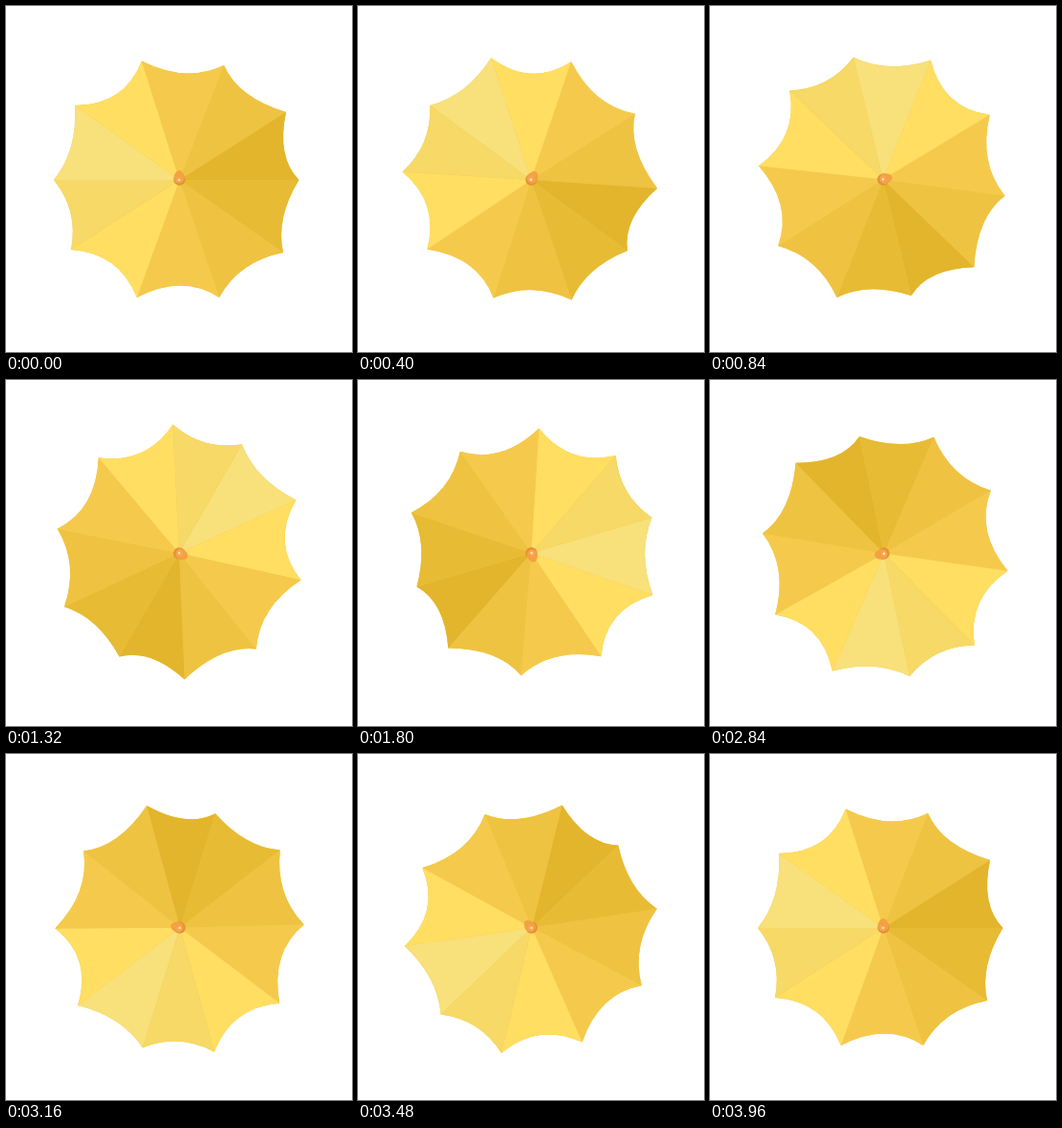
An HTML page with a canvas that plays this animation: 362 by 362 pixels, repeating every 4 s.

```html
<!DOCTYPE html>
<html lang="en">
<head>
<meta charset="utf-8">
<title>Spinning parasol</title>
<style>
  html, body { margin: 0; width: 100%; height: 100%; overflow: hidden; background: #fff; }
  canvas { display: block; width: 100vmin; height: 100vmin; }
</style>
</head>
<body>
<canvas id="stage"></canvas>
<script>
const SIZE = 362, STEP = 40, STEPS = 100;
const PIVOT = 181.5, HUB = [181.5, 182];

// Each panel: rib tip x, y, control point of its scalloped hem, colour.
const panels = [
  [50, 182, 75, 151, '#f8e07a'],
  [72, 104, 124, 104, '#ffde61'],
  [142, 57.5, 188, 81, '#f5ca4c'],
  [228, 62, 243, 96, '#efc342'],
  [293, 111, 283, 158, '#e2b52c'],
  [306.5, 182, 282, 222, '#e7bb34'],
  [290, 258, 244, 267, '#efc241'],
  [223, 305, 185, 280, '#f5ca4c'],
  [137, 305, 118, 258, '#ffde61'],
  [68, 255, 76, 214, '#f6d966']
];

const canvas = document.getElementById('stage');
const ctx = canvas.getContext('2d');
const ratio = window.devicePixelRatio || 1;
canvas.width = canvas.height = Math.round(SIZE * ratio);

const nextOf = i => panels[(i + 1) % panels.length];

function drawCanopy() {
  // A base coat keeps white from showing through the seams.
  ctx.beginPath();
  ctx.moveTo(panels[0][0], panels[0][1]);
  panels.forEach(([, , cx, cy], i) => {
    const [nx, ny] = nextOf(i);
    ctx.quadraticCurveTo(cx, cy, nx, ny);
  });
  ctx.fillStyle = '#f2c84c';
  ctx.fill();

  panels.forEach(([x, y, cx, cy, color], i) => {
    const [nx, ny] = nextOf(i);
    ctx.beginPath();
    ctx.moveTo(...HUB);
    ctx.lineTo(x, y);
    ctx.quadraticCurveTo(cx, cy, nx, ny);
    ctx.closePath();
    ctx.fillStyle = color;
    ctx.fill();
  });
}

function disc(x, y, r, color) {
  ctx.beginPath();
  ctx.arc(x, y, r, 0, Math.PI * 2);
  ctx.fillStyle = color;
  ctx.fill();
}

function drawCap() {
  disc(181.5, 181.7, 6.2, '#e99035');
  ctx.beginPath();
  ctx.moveTo(181.3, 172);
  ctx.bezierCurveTo(184, 172.2, 187, 176.5, 186.6, 180.5);
  ctx.bezierCurveTo(186, 187, 176, 187, 175.6, 180.5);
  ctx.bezierCurveTo(175.5, 176.5, 178.3, 172, 181.3, 172);
  ctx.fillStyle = '#f4a144';
  ctx.fill();
  disc(181, 181.8, 3, '#f6a956');
  disc(181.2, 182, 1.1, '#fff0d8');
}

function draw(now) {
  const step = Math.floor(now / STEP) % STEPS;
  // The last step closes the full turn, so it repeats the first pose.
  const angle = step / (STEPS - 1) * Math.PI * 2;
  ctx.setTransform(ratio, 0, 0, ratio, 0, 0);
  ctx.fillStyle = '#fff';
  ctx.fillRect(0, 0, SIZE, SIZE);
  ctx.translate(PIVOT, PIVOT);
  ctx.rotate(angle);
  ctx.translate(-PIVOT, -PIVOT);
  drawCanopy();
  drawCap();
}

let start = null;
function tick(now) {
  if (start === null) start = now;
  draw(now - start);
  requestAnimationFrame(tick);
}
draw(0);
requestAnimationFrame(tick);
</script>
</body>
</html>
```
